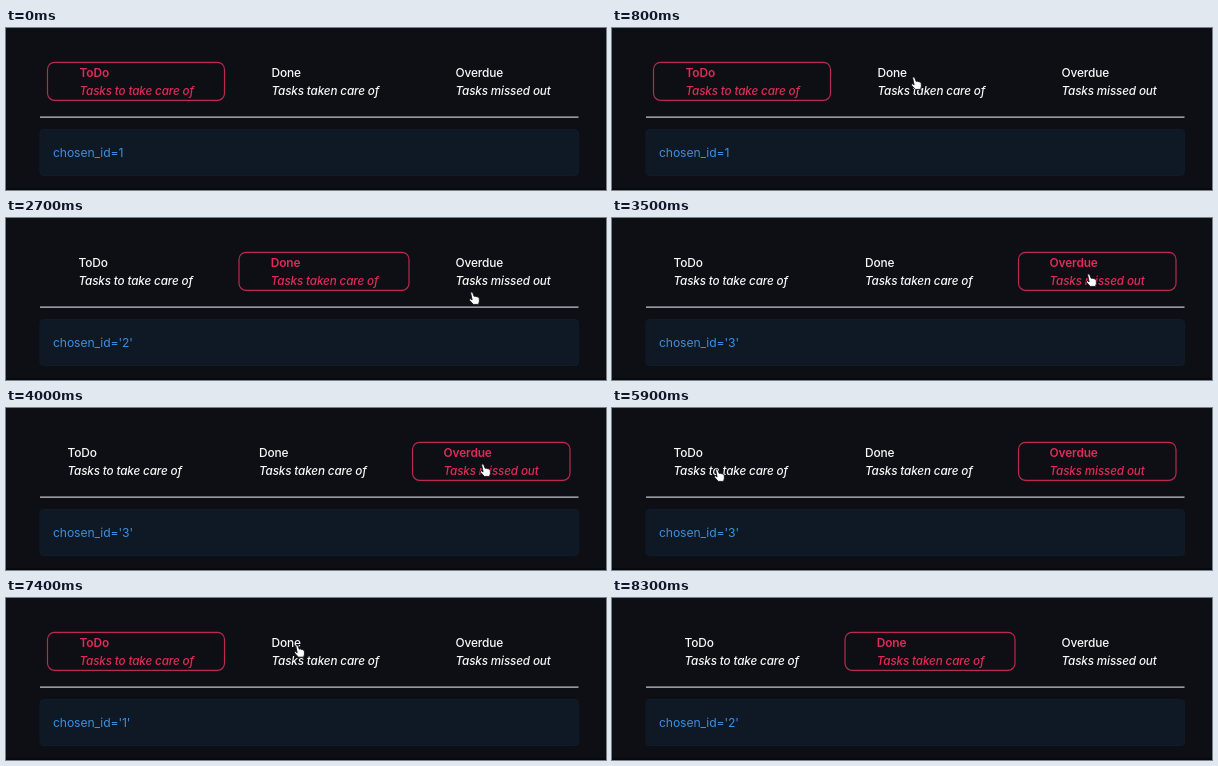
Recreate the animation shown at these times as an HTML page. Size 600 by 162 pixels, loop 8.4 s.

```html
<!DOCTYPE html>
<html lang="en">
<head>
<meta charset="utf-8">
<title>Task picker</title>
<style>
  html, body { margin: 0; width: 100%; height: 100%; overflow: hidden; background: #0e0f14; }
  svg { display: block; width: 600px; height: 162px; }
  text { font: 500 11.9px Inter, sans-serif; letter-spacing: -.01em; fill: #f8f8fa; }
  .note { font-style: italic; font-size: 11.7px; letter-spacing: -.012em; }
  .selected text { fill: #e02b58; }
  .selected .title { font-weight: 600; }
  #result { font-size: 12.2px; font-weight: 400; fill: #3d8edf; }
</style>
</head>
<body>
<svg viewBox="0 0 600 162">
  <rect width="600" height="162" fill="#0e0f14"/>
  <rect y="160" width="600" height="2" fill="#08090c"/>
  <rect id="frame" y="34.4" height="37.9" rx="7" fill="none" stroke="#b92a4c" stroke-width="1.2"/>
  <g id="options"></g>
  <path d="M34 89.2H572.5" stroke="#c4c4c8" stroke-width="1.3"/>
  <rect x="34" y="101.5" width="538.5" height="46" rx="3.5" fill="#0f1825" stroke="#121e2e" stroke-width=".8"/>
  <text id="result" x="47" y="129"></text>
  <path id="cursor" fill="#fff" stroke="#15151a" stroke-width=".9" stroke-linejoin="round"
    d="M-3.4-5.2Q-2.2-6.8-1.2-5.2L.2-1.6Q1.3-2.5 2-1.3Q3.2-2 3.7-.8Q5-1.2 5.2.4L5.4 3.2L4.6 6.4H-.7L-4.4 2.3Q-5.2.7-3.6.8L-1.9 1.9Z"/>
</svg>
<script>
const LOOP = 8400;
const labels = [
  ["ToDo", "Tasks to take care of"],
  ["Done", "Tasks taken care of"],
  ["Overdue", "Tasks missed out"]
];
const layouts = [
  { xs: [73.5, 265.5, 449.5], left: 41.5, width: 177 },
  { xs: [72.5, 264.7, 449.5], left: 233, width: 170 },
  { xs: [61.5, 253, 437.5], left: 406.5, width: 157.5 }
];
// [start time, selected option, text of its id]
const choices = [
  [0, 0, "1"], [900, 1, "'2'"], [3200, 2, "'3'"], [6100, 0, "'1'"], [7600, 1, "'2'"]
];
// [time, x, y] of the pointer
const route = [
  [300, 330, 116], [800, 304, 55], [2000, 304, 55], [2700, 468, 80],
  [3200, 479, 62], [4600, 479, 62], [5500, 107, 67], [6000, 107, 67],
  [6500, 173, 49], [6800, 173, 49], [7500, 300, 53], [8000, 300, 53], [8300, 330, 116]
];

const byId = id => document.getElementById(id);
const frame = byId("frame"), result = byId("result"), cursor = byId("cursor");

function svgNode(name, parent, attributes = {}) {
  const node = document.createElementNS("http://www.w3.org/2000/svg", name);
  for (const key in attributes) node.setAttribute(key, attributes[key]);
  return parent.appendChild(node);
}

const options = labels.map(([title, note]) => {
  const group = svgNode("g", byId("options"));
  svgNode("text", group, { class: "title", y: 48.6 }).textContent = title;
  svgNode("text", group, { class: "note", y: 67 }).textContent = note;
  return group;
});

function pointerAt(t) {
  const i = route.findIndex(stop => stop[0] > t);
  if (i < 1) return null;
  const [t0, x0, y0] = route[i - 1], [t1, x1, y1] = route[i];
  const p = (t - t0) / (t1 - t0), ease = p * p * (3 - 2 * p);
  return [x0 + (x1 - x0) * ease, y0 + (y1 - y0) * ease];
}

function draw(t) {
  const [, selected, id] = choices.findLast(choice => choice[0] <= t);
  const { xs, left, width } = layouts[selected];
  options.forEach((group, i) => {
    group.setAttribute("transform", `translate(${xs[i]} 0)`);
    group.classList.toggle("selected", i === selected);
  });
  frame.setAttribute("x", left);
  frame.setAttribute("width", width);
  result.textContent = "chosen_id=" + id;

  const point = pointerAt(t);
  cursor.style.display = point ? "" : "none";
  if (point) cursor.setAttribute("transform", `translate(${point})`);
}

const start = performance.now();
function tick() {
  draw((performance.now() - start) % LOOP);
  requestAnimationFrame(tick);
}
tick();
</script>
</body>
</html>
```
